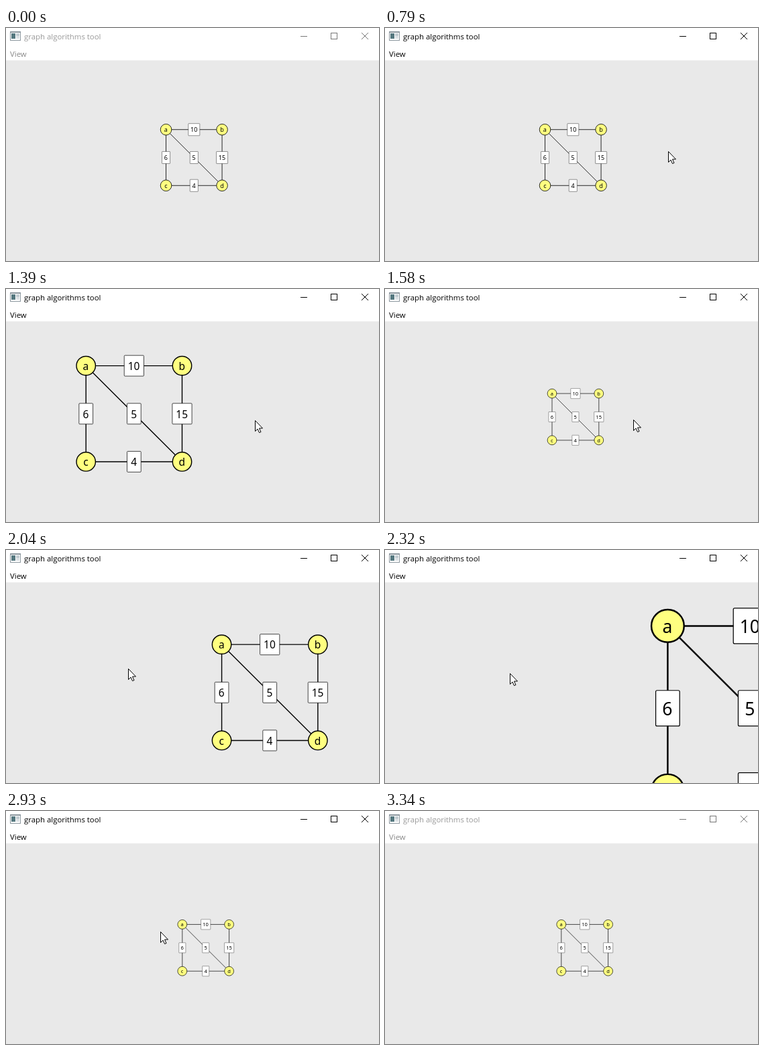
These frames come from a looping animation (556x348 px, 3390 ms). An HTML page with a canvas:

```html
<!DOCTYPE html>
<html lang="en">
<head>
<meta charset="utf-8">
<title>graph algorithms tool</title>
<style>
html, body { margin: 0; width: 100%; height: 100%; overflow: hidden; }
canvas { display: block; }
</style>
</head>
<body>
<canvas id="stage" width="556" height="348"></canvas>
<script>
const ctx = document.getElementById('stage').getContext('2d');
const LOOP = 3390;
const NOTCH = 1.0015 ** 120; // zoom factor of one wheel notch

// Bursts of activity: start, end, number of screen updates
const bursts = [
  [130, 410, 7], [560, 1060, 10], [1110, 1580, 10], [1670, 2180, 11],
  [2320, 2700, 8], [2840, 3160, 8]
];

// Wheel zooms: start, end, final notch, final graph centre
const home = [-1, 280.3, 193.5];
const zooms = [
  [782, 1060, 5, 61.1, 179.7],
  [1214, 1580, -2, 283.9, 191],
  [1823, 2027, 2, 393.2, 212.8],
  [2027, 2180, 5, 544.3, 236.3],
  [2320, 2537, 1, 366, 212.3],
  [2537, 2700, -2, 297.7, 204.3]
];

// Mouse path: time, x, y
const path = [
  [0, 440, 360], [130, 436, 335], [410, 424, 236], [560, 424, 232],
  [782, 422, 184], [838, 408, 193], [893, 398, 199], [1060, 382, 200],
  [1214, 372, 196], [1580, 370, 195], [1670, 350, 193], [1823, 182, 177],
  [2027, 182, 177], [2180, 182, 180], [2320, 186, 184], [2537, 197, 192],
  [2700, 198, 192], [2840, 204, 188], [2990, 290, 163], [3114, 460, 325],
  [3160, 470, 360]
];

const nodes = [['a', -50, -50], ['b', 50, -50], ['c', -50, 50], ['d', 50, 50]];
const edges = [[0, 1, '10'], [0, 2, '6'], [0, 3, '5'], [1, 3, '15'], [2, 3, '4']];

const clamp01 = v => Math.min(1, Math.max(0, v));
const mix = (a, b, u) => a + (b - a) * u;

// Time of the latest screen update
function lastUpdate(t) {
  let last = 0;
  for (const [start, end, count] of bursts) {
    if (t < start) break;
    const n = count - 1;
    last = mix(start, end, Math.floor(clamp01((t - start) / (end - start)) * n + 1e-6) / n);
  }
  return last;
}

function cameraAt(t) {
  let [k, x, y] = home;
  for (const [start, end, k1, x1, y1] of zooms) {
    if (t <= start) break;
    const next = Math.round(mix(k, k1, clamp01((t - start) / (end - start))));
    const u = (NOTCH ** next - NOTCH ** k) / (NOTCH ** k1 - NOTCH ** k);
    x = mix(x, x1, u);
    y = mix(y, y1, u);
    k = next;
  }
  return [NOTCH ** k, x, y];
}

function mouseAt(t) {
  const i = Math.max(1, path.findIndex(p => p[0] >= t));
  const [t0, x0, y0] = path[i - 1], [t1, x1, y1] = path[i];
  const u = clamp01((t - t0) / (t1 - t0));
  return [Math.round(mix(x0, x1, u)), Math.round(mix(y0, y1, u))];
}

function rect(color, ...box) {
  ctx.fillStyle = color;
  ctx.fillRect(...box);
}

function label(text, x, y) {
  ctx.fillStyle = '#000';
  ctx.fillText(text, x - 0.2, y + 4.4);
}

function drawGraph([scale, x, y]) {
  ctx.save();
  ctx.translate(x, y);
  ctx.scale(scale, scale);
  ctx.font = '10.8px "Noto Sans", sans-serif';
  ctx.textAlign = 'center';
  ctx.strokeStyle = '#000';
  ctx.lineWidth = 1;
  for (const [from, to] of edges) {
    ctx.beginPath();
    ctx.moveTo(nodes[from][1], nodes[from][2]);
    ctx.lineTo(nodes[to][1], nodes[to][2]);
    ctx.stroke();
  }
  for (const [name, nx, ny] of nodes) {
    ctx.beginPath();
    ctx.arc(nx, ny, 9.9, 0, 7);
    ctx.fillStyle = '#ffff80';
    ctx.fill();
    ctx.stroke();
    label(name, nx, ny);
  }
  ctx.lineWidth = 0.5;
  for (const [from, to, weight] of edges) {
    const mx = (nodes[from][1] + nodes[to][1]) / 2;
    const my = (nodes[from][2] + nodes[to][2]) / 2;
    const w = weight.length > 1 ? 20.4 : 14.5;
    ctx.beginPath();
    ctx.roundRect(mx - w / 2, my - 10.8, w, 21.6, 0.8);
    ctx.fillStyle = '#fff';
    ctx.fill();
    ctx.stroke();
    label(weight, mx, my);
  }
  ctx.restore();
}

function drawFrame(active) {
  rect('#fff', 0, 0, 556, 48);
  rect('#f0f0f0', 0, 48, 556, 1);

  rect('#8c979e', 6, 5, 16, 14);
  rect('#fff', 7, 7, 14, 11);
  rect('#55787f', 8, 8, 6, 8);
  rect('#c3cdd2', 15, 8, 5, 4);
  rect('#dde2e5', 15, 12, 5, 4);

  ctx.font = '11.4px "Open Sans", sans-serif';
  ctx.textAlign = 'left';
  ctx.fillStyle = active ? '#000' : '#999';
  ctx.fillText('graph algorithms tool', 27, 17);
  ctx.fillStyle = active ? '#000' : '#888';
  ctx.fillText('View', 6, 43);

  ctx.strokeStyle = active ? '#000' : '#777';
  ctx.lineWidth = 1;
  ctx.strokeRect(484.5, 7.5, 9, 9);
  ctx.stroke(new Path2D('M439 12.5h10M530 7l10 10M540 7l-10 10'));
}

const arrow = new Path2D('M.5 .5V16.5L4 13L6.5 18.5L9 17.5L6.5 12H11.5Z');

function drawMouse([x, y]) {
  ctx.save();
  ctx.translate(x, y);
  ctx.fillStyle = '#fff';
  ctx.strokeStyle = '#000';
  ctx.lineWidth = 1;
  ctx.fill(arrow);
  ctx.stroke(arrow);
  ctx.restore();
}

function draw(t) {
  const now = lastUpdate(t);
  rect('#e9e9e9', 0, 0, 556, 348);
  drawGraph(cameraAt(now));
  drawFrame(now >= 410 && t < 3340);
  drawMouse(mouseAt(now));
}

const begin = performance.now();
function tick() {
  draw((performance.now() - begin) % LOOP);
  requestAnimationFrame(tick);
}
tick();
</script>
</body>
</html>
```
